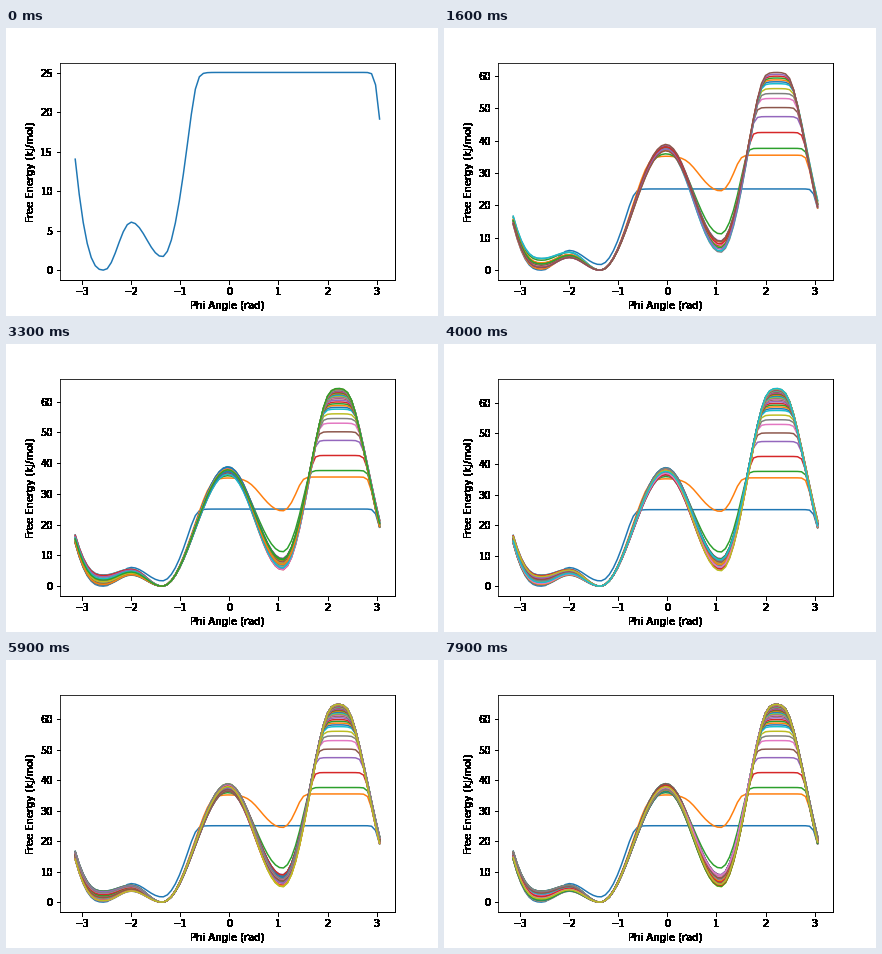
These frames come from a looping animation (432 px wide and 288 px high, 8 s). A matplotlib script:

```python
import numpy as np
import matplotlib.pyplot as plt
from matplotlib.animation import FuncAnimation

FRAMES, STEP = 80, 100
CURVES = FRAMES - 1
SOFT = 2.5                      # roundness of the fill level's edge
TURN = 2 * np.pi
phi = np.linspace(-np.pi, np.pi, 77, endpoint=False)

# angles of the wells and barriers, closing the circle
NODES = np.array([-2.55, -2.0, -1.37, -0.03, 1.08, 2.22, TURN - 2.55])


def landscape(heights):
    """Cosine slopes between extremes; the last descent is steeper."""
    x = np.where(phi < NODES[0], phi + TURN, phi)
    i = np.searchsorted(NODES, x, side="right") - 1
    t = (x - NODES[i]) / (NODES[i + 1] - NODES[i])
    power = np.where(i == len(NODES) - 2, 1.45, 1.0)
    blend = (0.5 + 0.5 * np.cos(np.pi * t)) ** power
    return heights[i + 1] + (heights[i] - heights[i + 1]) * blend


def fill_level(k):
    return np.interp(k, [0, 1, 2, 4, 6, 9, 15, 26, 40],
                     [23.35, 35.5, 37.6, 47.4, 53, 57.6, 61.2, 64.4, 65.7])


def profile(k, rng):
    """Free energy after k steps: the landscape explored up to the fill level."""
    young = np.exp(-k)
    u = rng.uniform(-1, 1, 3) * (1 - young ** 3)
    well = 2 + 1.8 * u[0] - 3.7 * young ** 3
    bump = 3.4 + 0.6 * well + 2 * young
    hill = 37.6 + 1.3 * u[1] + 7 * young
    dip = 7 + 2 * u[2] + 18 * np.exp(-1.9 * (k - 1))
    base = landscape(np.array([well, bump, 0, hill, dip, 68, well]))
    energy = -SOFT * np.logaddexp(-base / SOFT, -fill_level(k) / SOFT)
    return energy - energy.min()


def harden(img, dpi):
    """Turn soft edges into solid pixels."""
    img = img.copy()
    img[..., 3] = (img[..., 3] > 0).astype(float)
    return img, 0, 0


fig, ax = plt.subplots(figsize=(6, 4), dpi=72, facecolor="white")
fig.subplots_adjust(left=0.125, right=0.9, bottom=0.125, top=0.88)
ax.set_xlabel("Phi Angle (rad)")
ax.set_ylabel("Free Energy (kJ/mol)")
for part in (ax.xaxis, ax.yaxis, ax.spines["bottom"], ax.spines["right"]):
    part.set_agg_filter(harden)

rng = np.random.default_rng(4)
data = [profile(k, rng) for k in range(CURVES)]
lines = [ax.plot(phi, y, color=f"C{k % 10}")[0] for k, y in enumerate(data)]
tops = np.maximum.accumulate([y.max() for y in data])
margin = 0.05 * (phi[-1] - phi[0])
ax.set_xlim(phi[0] - margin, phi[-1] + margin)


def update(frame):
    count = max(1, frame)
    for k, line in enumerate(lines):
        line.set_visible(k < count)
    top = tops[count - 1]
    ax.set_ylim(-0.05 * top, 1.05 * top)
    return lines


anim = FuncAnimation(fig, update, frames=FRAMES, interval=STEP,
                     init_func=lambda: update(0), repeat=True, repeat_delay=0, blit=False)
plt.show()
```
